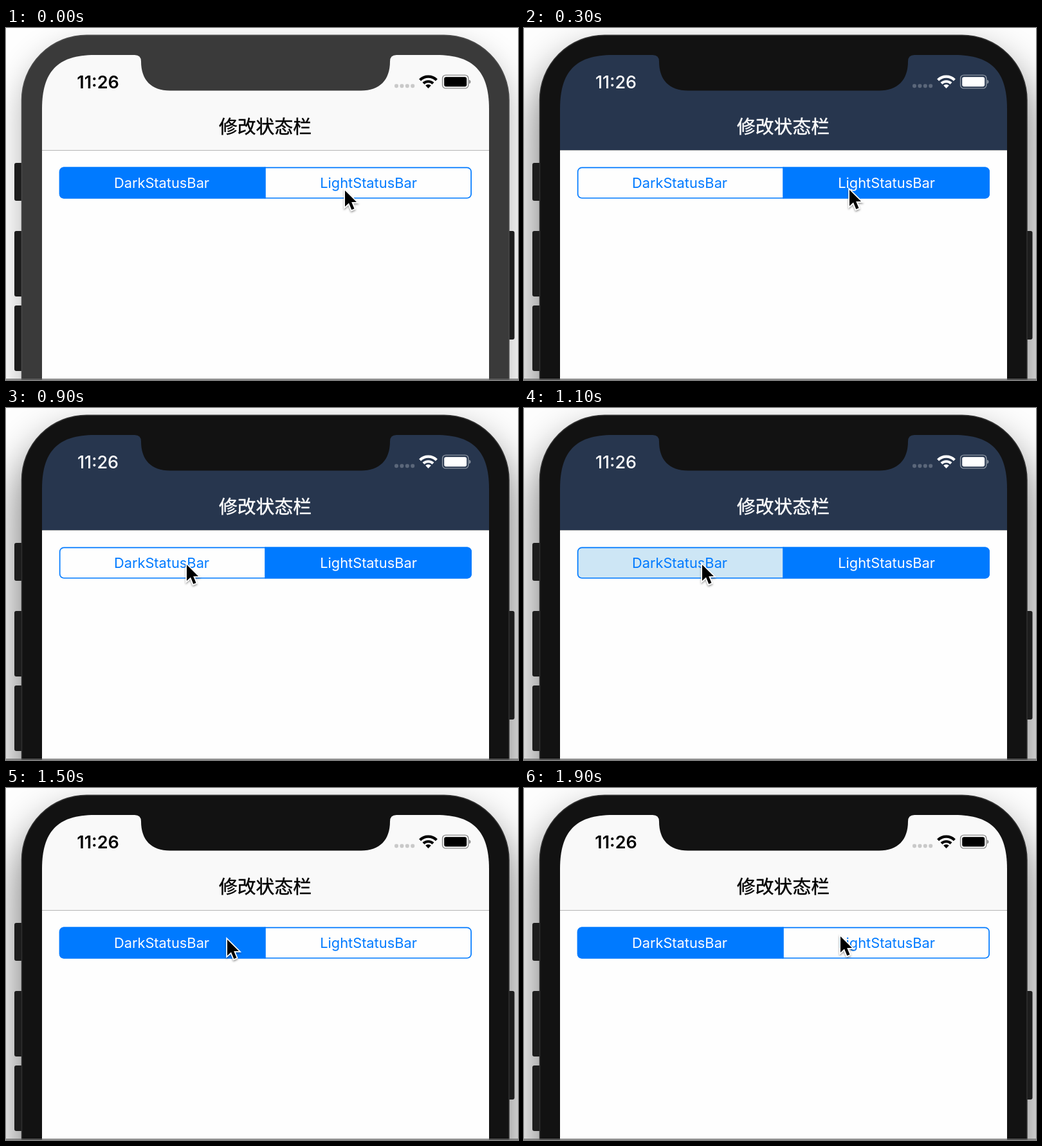
An HTML page that plays this animation: 796x548 px, repeating every 2000 ms.

```html
<!DOCTYPE html>
<html lang="zh-CN">
<head>
<meta charset="utf-8">
<title>修改状态栏</title>
<style>
  html, body { margin: 0; width: 100%; height: 100%; overflow: hidden; background: #fff; }
  #stage { position: relative; width: 796px; height: 548px; overflow: hidden; background: #fefefe; }
  #shadow { position: absolute; left: 25px; top: 12px; width: 756px; height: 900px; border-radius: 101px; }
  #shadow { box-shadow: 0 20px 50px rgba(0, 0, 0, .3); }
  .active #shadow { box-shadow: 0 36px 64px 6px rgba(0, 0, 0, .52); }
  svg { position: absolute; left: 0; top: 0; }

  #body { fill: #3a3a3a; stroke: #4a4a4a; }
  #notch { fill: #3a3a3a; }
  .active #body { fill: #121212; stroke: #303030; }
  .active #notch { fill: #121212; }

  #stage { --ink: #000; --bar: #f9f9f9; --dots: #c9c9c9; --case: #8c8c8c; }
  #stage.light { --ink: #fff; --bar: #27364e; --dots: #5b677a; --case: #8c95a2; }
  #bar { fill: var(--bar); }
  .ink { fill: var(--ink); }
  .arc { fill: none; stroke: var(--ink); stroke-width: 4.2; }
  #dots { fill: var(--dots); }
  .case { fill: none; stroke: var(--case); stroke-width: 1.4; }
  .nub { fill: var(--case); }

  text { text-anchor: middle; }
  #clock { font: 600 27px Inter, Roboto, sans-serif; }
  .light #clock { font-weight: 500; }
  #title { font: 500 28.8px "Noto Sans CJK SC", "Noto Sans CJK", sans-serif; stroke: var(--ink); stroke-width: .45; }
  .label { font: 400 21.8px Inter, Roboto, sans-serif; }
</style>
</head>
<body>
<div id="stage">
  <div id="shadow"></div>
  <svg width="796" height="548" viewBox="0 0 796 548">
    <defs>
      <clipPath id="screen">
        <path d="M56 560V126C56 68 80 42 138 42H669C727 42 751 68 751 126V560Z"/>
      </clipPath>
      <clipPath id="pill"><rect x="82.800" y="216.600" width="641.200" height="49" rx="7"/></clipPath>
      <filter id="drop" x="-50%" y="-50%" width="200%" height="200%">
        <feDropShadow dx="0" dy="2" stdDeviation="1.8" flood-opacity=".4"/>
      </filter>
    </defs>

    <g fill="#1d1d1d">
      <rect x="13" y="210" width="16" height="59" rx="3"/>
      <rect x="13" y="316" width="16" height="102" rx="3"/>
      <rect x="13" y="432" width="16" height="102" rx="3"/>
      <rect x="775" y="316" width="15.500" height="169" rx="3"/>
    </g>
    <rect id="body" stroke-width="1.5" x="24.500" y="11.200" width="757.500" height="900" rx="101"/>

    <g clip-path="url(#screen)">
      <rect x="56" y="190" width="695" height="362" fill="#fefefe"/>
      <rect id="bar" x="56" y="42" width="695" height="148"/>
      <rect x="56" y="190" width="695" height="1" fill="#b4b4b4"/>
    </g>
    <path id="notch" d="M200 41V42Q210 42 210 52C210 81 226 97.500 255 97.500H552C581 97.500 597 81 597 52Q597 42 607 42V41Z"/>

    <text id="clock" class="ink" x="143" y="93.500">11:26</text>
    <text id="title" class="ink" x="403" y="163.500">修改状态栏</text>

    <g id="dots"></g>
    <g transform="translate(656.500 94)">
      <path class="ink" d="M0 0L-4.300 -4.500A6.200 6.200 0 0 1 4.300 -4.500Z"/>
      <path class="arc" d="M-7.500 -7.700A10.750 10.750 0 0 1 7.500 -7.700"/>
      <path class="arc" d="M-12.900 -13A18.300 18.300 0 0 1 12.900 -13"/>
    </g>
    <rect class="case" x="678.600" y="73.400" width="40.200" height="20.500" rx="5"/>
    <rect class="ink" x="681.200" y="76.200" width="35" height="15" rx="3"/>
    <path class="nub" d="M720 80.500Q722.500 81.500 722.500 83.700T720 87Z"/>

    <g clip-path="url(#pill)">
      <rect id="leftFill" x="82" y="216" width="321" height="50"/>
      <rect id="rightFill" x="403" y="216" width="322" height="50"/>
      <rect x="402.200" y="216" width="1.600" height="50" fill="#007aff"/>
    </g>
    <rect x="83.650" y="217.450" width="639.500" height="47.300" rx="6.200" fill="none" stroke="#007aff" stroke-width="1.700"/>
    <text id="leftText" class="label" x="242" y="249">DarkStatusBar</text>
    <text id="rightText" class="label" x="563.500" y="249">LightStatusBar</text>

    <rect y="546" width="796" height="1.500" fill="#666"/>

    <g id="cursor" filter="url(#drop)">
      <path d="M0 0V25L6 19.500L10.300 30L14.500 28.200L10.200 18H18Z" stroke="#fff" stroke-width="3.400" paint-order="stroke"/>
    </g>
  </svg>
</div>

<script>
const LOOP = 2000, STEP = 100;
const BLUE = '#007aff', WHITE = '#fefefe';
const $ = id => document.getElementById(id);

// left fill, left text, right fill, right text
const looks = {
  dark:       [BLUE, WHITE, WHITE, BLUE],
  toLight:    ['#3395ff', '#b0d6fb', '#94d0fd', '#5fb0fb'],
  light:      [WHITE, BLUE, BLUE, WHITE],
  pressDark:  ['#cde6f5', BLUE, BLUE, WHITE],
  toDark:     [BLUE, WHITE, '#f5f7fa', BLUE]
};
const phases = [[0, 'dark'], [100, 'toLight'], [200, 'light'], [1100, 'pressDark'], [1200, 'toDark'], [1300, 'dark']];

// time, x, y of the pointer tip
const path = [
  [0, 527, 253], [200, 527, 253], [300, 506, 252], [400, 458, 249], [500, 408, 247],
  [600, 365, 246], [700, 326, 245], [800, 297, 244], [900, 281, 244], [1000, 277, 244],
  [1200, 277, 244], [1300, 283, 242], [1400, 308, 239], [1500, 344, 236], [1900, 492, 231]
];

for (let i = 0; i < 4; i++) {
  $('dots').innerHTML += `<rect x="${604 + i * 8.4}" y="87.200" width="6" height="6" rx="2.400"/>`;
}

function pointerAt(t) {
  const i = Math.max(1, path.findIndex(p => p[0] >= t));
  const [t0, x0, y0] = path[i - 1], [t1, x1, y1] = path[i];
  const k = (t - t0) / (t1 - t0);
  return [x0 + (x1 - x0) * k, y0 + (y1 - y0) * k];
}

function draw(now) {
  const t = Math.floor(now % LOOP / STEP) * STEP;
  const look = looks[phases.filter(p => p[0] <= t).pop()[1]];
  ['leftFill', 'leftText', 'rightFill', 'rightText'].forEach((id, i) => $(id).style.fill = look[i]);
  $('stage').classList.toggle('active', t >= 100);
  $('stage').classList.toggle('light', t >= 100 && t < 1200);
  $('cursor').setAttribute('transform', `translate(${pointerAt(t)})`);
}

const start = performance.now();
function tick() {
  draw(performance.now() - start);
  requestAnimationFrame(tick);
}
tick();
</script>
</body>
</html>
```
